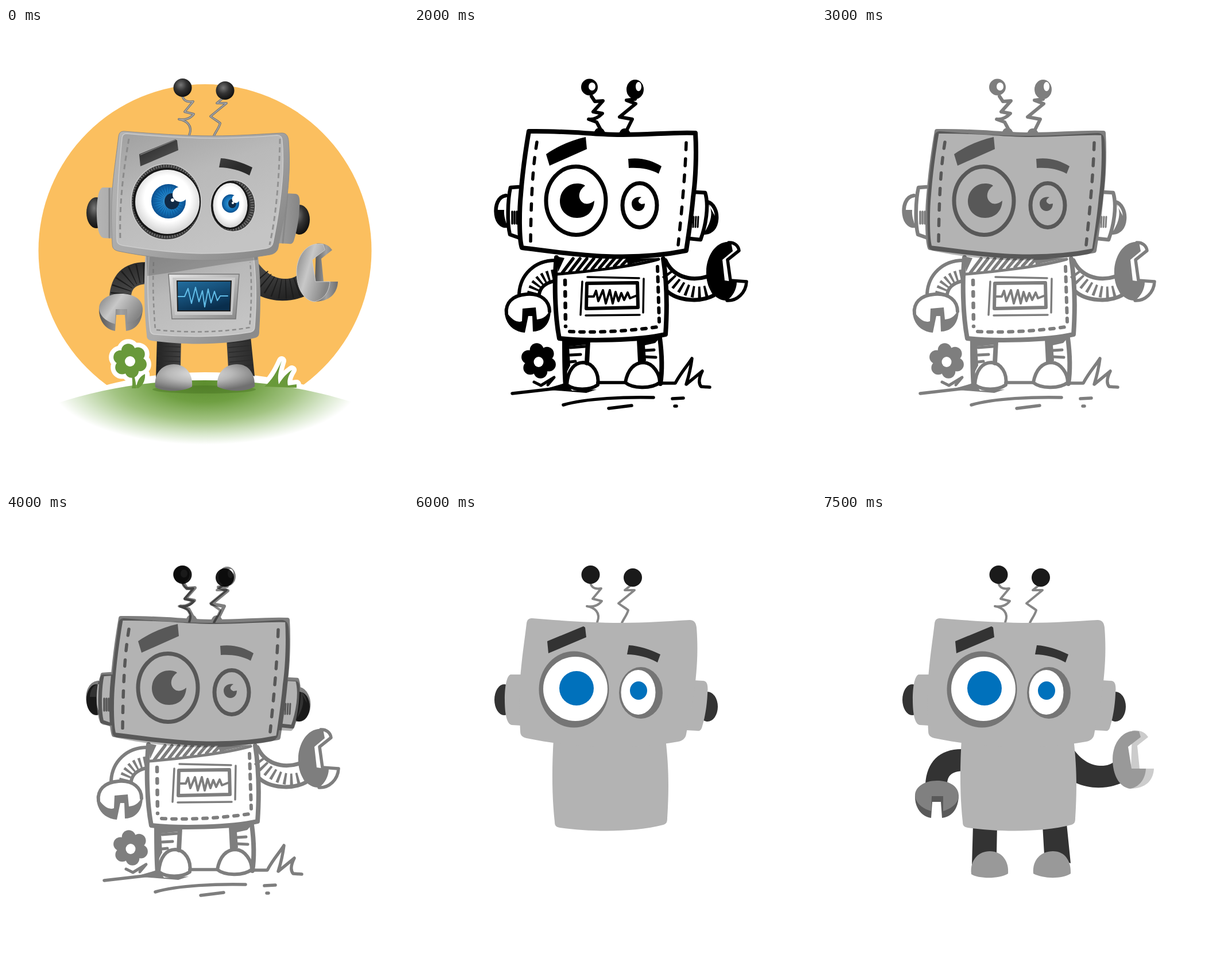
Animation, 700 px wide and 800 px high, one loop 8 s. Source, as an HTML page:

```html
<!DOCTYPE html>
<html lang="en">
<head>
<meta charset="utf-8">
<title>Robot, from sketch to colour</title>
<style>
html, body { margin: 0; width: 100%; height: 100%; overflow: hidden; background: #fff; }
svg { display: block; width: 100%; height: 100%; }
</style>
</head>
<body>
<svg id="stage" viewBox="0 0 700 800"></svg>
<script>
const LOOP = 8000;

// Drawing helpers: each returns SVG markup.
const fill = (d, c = 'currentColor', more = '') => `<path d="${d}" fill="${c}" ${more}/>`;
const line = (d, w, c = 'currentColor', more = '') =>
  `<path d="${d}" fill="none" stroke="${c}" stroke-width="${w}" stroke-linejoin="round" stroke-linecap="round" ${more}/>`;
const faint = (d, w, alpha = .5) => line(d, w, 'currentColor', `opacity="${alpha}"`);
const dash = (d, w, pattern, c = 'currentColor', cap = 'round') =>
  `<path d="${d}" fill="none" stroke="${c}" stroke-width="${w}" stroke-dasharray="${pattern}" stroke-linecap="${cap}"/>`;
const ribs = (d, w, pattern, c = 'currentColor') => dash(d, w, pattern, c, 'butt');
const oval = (x, y, rx, ry, c, more = '') =>
  `<ellipse cx="${x}" cy="${y}" rx="${rx}" ry="${ry}" fill="${c}" ${more}/>`;
const ring = (x, y, rx, ry, w, alpha = 1) =>
  oval(x, y, rx, ry, 'none', `stroke="currentColor" stroke-width="${w}" opacity="${alpha}"`);
const move = (x, y, s) => `<g transform="translate(${x} ${y})">${s}</g>`;
const stops = list => list.map((c, i) => {
  const [color, at = i / (list.length - 1)] = c.split('@');
  return `<stop offset="${at}" stop-color="${color}"/>`;
}).join('');
const linear = (id, x2, y2, ...list) =>
  `<linearGradient id="${id}" x1="0" y1="0" x2="${x2}" y2="${y2}">${stops(list)}</linearGradient>`;
const radial = (id, x, y, r, ...list) =>
  `<radialGradient id="${id}" cx="${x}" cy="${y}" r="${r}">${stops(list)}</radialGradient>`;
const hatch = (n, x, y, step, dx, dy, w) =>
  Array.from({ length: n }, (_, i) => line(`M${x + i * step},${y}l${dx},${dy}`, w)).join('');
const petals = (x, y, dist, r, c, more) => Array.from({ length: 6 }, (_, i) => {
  const a = (i * 60 + 20) * Math.PI / 180;
  return oval((x + dist * Math.cos(a)).toFixed(1), (y + dist * Math.sin(a)).toFixed(1), r, r, c, more);
}).join('');

// Outlines shared by the flat and the shaded robot.
const P = {
  head: 'M206,180C255,184 310,188 360,188C405,188 440,185 480,183C488,183 491,188 492,196C495,235 493,265 489,300C484,335 478,360 474,382C473,390 466,394 460,395C420,402 380,405 339,405C290,404 240,398 196,389C188,387 185,384 185,376C183,340 183,300 186,272C189,240 193,215 196,189C197,182 200,180 206,180Z',
  earL: 'M168,278L187,278L187,367L170,366C160,364 158,340 158,322C158,300 161,281 168,278Z',
  earR: 'M486,288L504,289C512,290 512,300 511,312C510,335 506,355 502,368C500,376 497,377 492,376L472,375Z',
  springL: 'M307,118C309,126 314,130 326,128L311,146L327,150C321,158 311,161 301,159C314,161 326,170 319,187',
  springR: 'M377,123L367,131L384,131L356,154C364,160 370,163 373,166C371,174 365,181 362,188',
  browL: 'M232,220L295,194L298,196L300,213L234,241Z',
  browR: 'M374,227C392,228 410,234 429,243L424,257C410,249 390,243 371,243Z',
  body: 'M243,390C240,440 240,490 245,535C245,542 248,544 254,545C310,553 385,553 434,540C440,538 441,535 441,528C444,480 444,440 438,390Z',
  legL: 'M263,540L305,540L304,590L261,610Z',
  legR: 'M384,540L426,538L433,607L387,592Z',
  footL: 'M260,626C257,600 274,586 292,586C314,586 326,604 324,625C308,635 272,634 260,626Z',
  footR: 'M368,625C366,600 382,586 402,586C424,586 434,604 433,625C417,635 385,634 368,625Z',
  armL: 'M246,408C205,407 182,430 180,470L218,470C218,455 225,447 246,446Z',
  armR: 'M436,405C452,430 472,438 490,437C500,436 506,433 510,428L522,467C500,476 470,480 440,466Z',
  clawSide: 'M162,488C161,512 175,526 190,528L192,500L207,500L209,528C226,526 238,512 238,488L212,480L190,480Z',
  clawTop: 'M190,516L191,490L211,490L211,516C228,511 238,500 238,489C238,473 222,463 200,463C178,463 162,474 162,489C163,502 175,512 190,516Z',
  wrenchSide: 'M540,376C556,374 563,380 568,387L549,402L553,442L578,442C577,463 563,477 537,477Z',
  wrench: 'M552,377C524,371 506,398 506,425C506,455 519,475 537,477C552,474 563,461 564,442L539,442L533,404L555,387Z'
};
const EARS = [[157, 322, 17, 27], [511, 334, 18, 26]];

const flat = {
  legs: fill(P.legL + P.legR, '#333') + fill(P.footL + P.footR, '#999'),
  arms: fill(P.armL + P.armR, '#333'),
  hands: fill(P.clawSide, '#595959') + fill(P.clawTop, '#808080') +
    fill(P.wrenchSide, '#ccc') + fill(P.wrench, '#999'),
  body: fill(P.body, '#b3b3b3'),
  ears: EARS.map(e => oval(...e, '#333')).join('') + fill(P.earL + P.earR, '#b3b3b3'),
  antennae: line(P.springL + P.springR, 4, '#868686') +
    oval(307.5, 104, 16, 16, '#1a1a1a') + oval(381, 109, 16, 16, '#1a1a1a'),
  head: fill(P.head, '#b3b3b3'),
  eyes: oval(278.5, 304, 61, 66.5, '#757575') + oval(281, 303, 56, 56, '#fff') + oval(283, 302, 30, 30, '#0071bc') +
    oval(395, 310, 38, 45, '#757575') + oval(390.5, 309, 30, 39, '#fff') + oval(391, 306, 15, 16, '#0071bc'),
  brows: fill(P.browL + P.browR, '#333')
};

const footLines =
  line('M266,622C268,595 280,583 295,583C312,584 323,602 320,622C306,632 280,632 266,622Z', 6) +
  line('M368,618C372,595 384,583 400,583C416,584 428,602 428,618C412,630 380,628 368,618Z', 6);

const ink =
  line('M200,180C250,179 290,183 330,185C390,189 440,181 490,183C492,215 491,260 486,295C483,330 478,360 474,388C430,397 385,400 335,398C280,396 230,388 188,383C183,370 183,320 186,290C189,250 194,215 200,180Z', 8) +
  // antennae
  fill('M291,103a14.5,14.5 0 1 0 29,0a14.5,14.5 0 1 0 -29,0ZM304,102a6,7 0 1 0 12,0a6,7 0 1 0 -12,0Z', 'currentColor', 'fill-rule="evenodd"') +
  fill('M370,107a15,17 0 1 0 30,0a15,17 0 1 0 -30,0ZM386,102a5,8 0 1 0 10,0a5,8 0 1 0 -10,0Z', 'currentColor', 'fill-rule="evenodd"') +
  line('M309,119L315,128L329,127L312,146L328,149C320,157 312,160 304,159L318,164L325,177', 6) +
  line('M385,124L370,126L386,132L358,155L380,159L371,177', 6) +
  fill('M313,185a10,11 0 0 1 20,0ZM357,186a10,11 0 0 1 20,0Z') +
  // face
  fill('M230,220C250,206 275,195 299,190L301,211L236,240ZM373,228C395,225 415,231 431,241L426,254C410,245 392,243 374,244Z') +
  ring(282, 301, 52, 59.5, 7) + ring(393, 309, 30, 38.5, 7) +
  fill('M298,275C286,283 284,298 295,305C301,308 308,306 314,301C313,320 301,331 284,331C266,331 254,318 254,302C254,284 268,271 284,271C290,271 295,272 298,275Z') +
  fill('M396,295C389,299 389,304 396,307L402,306C402,314 397,319 391,319C384,319 379,313 379,306C379,299 386,293 396,295Z') +
  dash('M214,199C209,230 204,270 203,376', 5.5, '11 16') + dash('M474,200C472,260 466,320 460,378', 5.5, '12 16') +
  // ears
  line('M182,277L168,278C163,300 162,340 167,360L184,366M160,292C146,294 141,310 143,325C145,340 154,346 162,345', 6.5) +
  fill('M143,317L157,317C156,328 160,338 163,346C150,346 143,335 143,317Z') +
  hatch(3, 171, 320, 4, 0, 21, 3.5) + hatch(4, 483, 329, 4, -1, 18, 3) +
  line('M489,286L507,287C514,310 508,345 499,369L480,367M511,303C522,306 528,320 527,333C526,348 518,356 506,357', 6.5) +
  fill('M511,304C523,318 517,340 505,357C520,357 528,345 527,333Z') +
  // body
  line('M248,400C244,440 245,500 253,541C300,546 390,545 438,534C441,490 440,440 434,402', 8) +
  fill('M248,398L262,401L251,425Z') +
  line('M250,429C300,425 380,416 426,403', 5) +
  Array.from({ length: 10 }, (_, i) => line(`M${277 + i * 12},402L${258 + i * 13},${427 - i * 1.7}`, 5.5)).join('') +
  fill('M370,402L428,401L372,412Z') +
  dash('M263,440L264,520', 6.5, '7 13') + dash('M271,529C330,532 390,526 424,521', 6, '7 11') + dash('M424,416L427,512', 6, '8 10') +
  line('M293,442L290,500M302,434L392,436M400,437L399,496M299,501L393,500', 3.5) +
  line('M301,445L389,444L390,487L300,489Z', 6) +
  line('M303,468L313,468L317,458L321,476L329,457L334,480L341,457L346,480L351,460L356,476L361,462L366,474L372,461L376,471L386,467', 4) +
  // arms and hands
  line('M246,405C210,405 185,430 183,463M244,441C228,445 220,452 218,464', 6) +
  ribs('M244,430C222,433 209,446 206,463', 18, '4 4.5') +
  line('M161,498C159,480 170,466 196,464C222,462 236,476 236,494', 6) +
  fill('M158,488C165,505 178,515 188,511L189,489L212,487L214,508C226,507 234,500 238,488C239,514 226,529 207,529L206,502L199,502L193,531C170,529 156,512 158,488Z') +
  line('M438,405C450,432 480,443 511,433M440,458C460,477 500,478 522,466', 7) +
  ribs('M440,428C460,456 490,468 517,456', 20, '4.5 6.5') +
  line('M548,374C558,373 565,380 566,388L546,404L551,440L579,442C578,462 562,476 545,475', 5.5) +
  fill('M552,373C525,369 507,400 509,430C510,458 527,476 545,475C555,468 562,455 562,443L541,440L537,404L555,389Z') +
  // legs, ground, plants
  line('M262,545C262,570 262,600 264,624M303,546L301,584M392,543L394,582M428,540C432,570 432,600 429,620', 8) +
  fill('M260,545L303,545L300,552L270,555L272,588L262,608ZM390,542L428,540L420,549L402,553L404,580L394,584Z') +
  line('M272,557L298,555M272,570L290,569M272,582L281,581M402,562L418,561M402,573L421,574', 5) +
  footLines +
  line('M171,637L266,626M320,618L368,618M430,619L455,619C465,600 475,590 484,576C482,592 479,605 474,621L502,598C497,608 494,618 500,625L515,626', 5.5) +
  fill('M225,630L266,618L275,632L318,630L300,636Z') +
  line('M260,657C300,645 370,643 417,644M339,663L379,658M450,646L469,645M454,659L457,659', 5.5) +
  petals(217, 580, 19, 12, 'currentColor') + oval(217, 580, 14, 14, 'currentColor') + oval(217, 582, 8.5, 9, '#fff') +
  line('M209,617L221,623L244,609L233,622', 5);

const sketch =
  line('M198,179C240,176 300,183 360,184C400,184 440,182 470,178M487,182C494,230 490,300 474,385M184,374C230,390 290,399 340,399C390,399 440,394 474,388M200,180C188,240 181,310 183,376', 7, 'currentColor', 'opacity=".92"') +
  faint('M205,184C260,178 300,186 350,186M481,186C482,240 482,290 471,350M250,390C300,396 380,404 470,397', 4) +
  ring(303, 101, 11.5, 13, 7, .9) + ring(383, 105, 11.5, 12.5, 6, .9) +
  line('M307,118L314,128L325,126L313,143L327,147L300,157L317,160L322,178M386,121L370,123L384,129L357,153L377,158L365,176', 8) +
  faint('M231,222L295,192L299,206L236,232ZM371,225L429,238L427,249L369,239Z', 5, .88) +
  // eyes
  ring(277, 298, 50, 56, 9, .85) + ring(276, 297, 44, 51, 3, .45) + ring(389, 306, 30.5, 39, 8.5, .9) +
  oval(281, 298, 27, 29, 'currentColor', 'opacity=".75"') + oval(274, 302, 15, 23, 'currentColor') + oval(295, 288, 14, 16, '#fff') +
  oval(387, 303, 11, 13, 'currentColor') + oval(392, 298, 4, 5, '#fff') +
  faint(`M211,198L208,213M207,232L204,258M203,274L200,300M201,318L203,346M468,207L468,235M466,250L465,275M464,293L462,313M461,325L460,346`, 5, .75) +
  // ears
  fill('M156,285C138,290 132,325 144,345L160,352Z', 'currentColor', 'opacity=".65"') + oval(151, 315, 5, 13, '#fff') +
  line('M160,284C137,290 134,335 145,348L162,355M164,275L159,353L182,361M166,273L178,273M178,279L172,358', 6) +
  fill('M479,310L497,308L495,344L478,347Z', 'currentColor', 'opacity=".55"') +
  line('M488,287L502,288C505,310 504,340 492,367L476,366M505,302C531,310 533,344 500,356M510,310C518,325 517,342 504,352', 6.5) +
  // body
  fill('M250,401L410,404L350,416L255,428Z', 'currentColor', 'opacity=".5"') +
  `<g opacity=".5">${hatch(8, 280, 402, 15, -22, 21, 2)}</g>` +
  line('M246,400C243,440 243,490 245,532C245,540 252,541 260,542C320,547 390,542 437,533C440,490 438,440 433,401', 7.5) +
  faint('M261,405L258,495M426,405L431,500M270,526L420,523', 5) +
  faint('M256,428C300,424 360,416 420,406', 3, .6) +
  faint('M291,436L394,433L395,493L290,495Z', 5) +
  line('M297,441L385,440L385,486L297,487Z', 5) +
  faint('M300,462L312,462L317,451L321,470L327,454L332,470L339,447L343,473L348,453L353,469L358,456L363,468L368,457L373,461L383,461', 4.5, .8) +
  // arms and hands
  line('M244,404C208,404 185,425 181,460M240,440C222,444 216,452 213,464', 6) +
  ribs('M241,422C215,422 200,440 198,461', 27, '4 6') +
  line('M174,515C145,496 155,464 192,461C222,459 236,476 232,494C231,510 220,518 209,520L207,487L190,487L187,523L174,515M187,512C170,510 158,498 157,485M211,508C223,507 231,498 232,486', 7) +
  line('M434,405C450,430 475,437 506,431M440,452C460,476 495,472 512,463', 7) +
  ribs('M440,430C460,454 485,460 509,449', 30, '4.5 6.5') +
  line('M549,371C522,365 506,390 507,424C508,454 523,473 543,473C558,466 564,452 564,438L540,437L529,404L551,390L540,368M549,371L566,387L541,403L548,435L578,437C576,460 560,475 543,474', 5.5) +
  // legs, ground, plants
  line('M258,542L261,620M298,546L294,582M391,545L394,582M428,541C428,570 427,600 424,619', 8) +
  faint('M266,554L292,553M266,566L291,565M266,577L283,577M398,552L421,552M399,565L423,564M403,576L423,576', 6, .75) +
  move(-4, -1, footLines) +
  line('M172,632C210,627 235,626 266,622M314,619C330,616 350,617 366,617M426,620L452,620', 6.5) +
  line('M452,620C463,601 472,587 488,573C476,592 470,608 472,619C481,608 489,601 499,598C490,610 489,620 497,624', 8) +
  faint('M254,655C290,643 360,645 418,643', 6, .85) +
  faint('M333,661L375,658M438,652L449,651M502,624L517,624M267,660L270,668', 5) +
  petals(214, 577, 18, 10, 'currentColor', 'opacity=".85"') + ring(214, 577, 12, 12, 7) + oval(214, 577, 8, 9, '#fff') +
  line('M216,603L222,618M227,606L222,618', 7);

const LEAF = '#69993a';
const halo = 'stroke="#fff" stroke-width="16" stroke-linejoin="round"';
const stem = 'M218,600C220,612 221,620 219,628L227,628C226,616 224,608 221,600ZM227,627C228,615 233,607 242,603C243,614 238,624 230,628Z';
const grass = 'M450,625C463,614 472,598 480,580C475,596 472,608 475,621C482,609 489,602 498,596C491,607 489,615 491,623L506,621L506,627Z';
const ball = (x, y) => oval(x, y, 16, 16, 'url(#ball)');

const shaded =
  oval(346.5, 388, 290, 290, '#fbbf5f') +
  fill('M60,665C150,622 245,600 346,600C450,600 545,622 640,665L640,760L60,760Z', '#fff') +
  petals(216, 580, 18, 12, '#fff', halo) + fill(stem + grass, '#fff', halo) +
  fill('M83,656C170,627 255,614 346,614C440,614 525,627 616,656L616,730L83,730Z', 'url(#hill)') +
  petals(216, 580, 18, 12, LEAF) + oval(216, 580, 14, 14, LEAF) + oval(216, 581, 9, 9, '#fff') + fill(stem + grass, LEAF) +
  oval(345, 630, 90, 7, '#3c651b', 'opacity=".35"') +
  // limbs
  fill(P.legL + P.legR, 'url(#tube)') + ribs('M284,546L282,600', 40, '1.5 7', '#2a2a2a') + ribs('M406,546L411,600', 40, '1.5 7', '#2a2a2a') +
  fill(P.footL + P.footR, 'url(#foot)') +
  fill(P.armL + P.armR, 'url(#arm)') +
  ribs('M241,427C214,427 199,445 199,468', 34, '2 8', '#1c1c1c') +
  ribs('M443,434C462,456 485,461 513,449', 34, '2 8', '#1c1c1c') +
  fill(P.clawSide, 'url(#steelDark)') + fill(P.clawTop, 'url(#steel)') +
  fill(P.wrenchSide, 'url(#steelDark)') + fill(P.wrench, 'url(#steel)') + line(P.wrench, 1, '#ccc') +
  // body
  fill(P.body, 'url(#rim)') +
  fill('M249,398C246,440 247,490 251,527C252,532 255,534 260,534C320,540 380,538 426,530C431,529 433,526 433,520C437,470 435,430 431,398Z', 'url(#plate)', 'stroke="#d0d0d0" stroke-width="1.5"') +
  ribs('M257,408C255,450 257,490 260,526C320,532 380,530 424,522C428,480 428,440 425,408', 2.5, '7 5', '#8c8c8c') +
  fill('M244,396L438,396L438,404C370,412 310,424 246,432Z', '#555', 'opacity=".35"') +
  fill('M283,429L406,429L400,507L289,507Z', 'url(#frame)', 'stroke="#777" stroke-width="1.5"') +
  fill('M290,435L399,435L394,500L294,500Z', '#c9c9c9') +
  fill('M298,441L392,441L390,493L299,493Z', 'url(#screen)', 'stroke="#222" stroke-width="2"') +
  line('M300,468L311,468L317,454L323,480L330,452L336,477L342,458L346,486L352,455L357,479L363,459L368,475L373,467L386,467', 2, '#62bde8') +
  // head
  EARS.map(e => oval(...e, 'url(#ball)')).join('') + fill(P.earL + P.earR, 'url(#ear)') +
  line('M180,280L180,365M490,291L482,374', 3, '#888') +
  line(P.springL + P.springR, 4, '#777') + line(P.springL + P.springR, 1.5, '#aaa') + ball(307.5, 104) + ball(381.5, 109) +
  fill(P.head, 'url(#rim)', 'stroke="#8b8b8b" stroke-width="1"') +
  fill('M210,184C255,188 310,192 360,192C405,192 440,189 472,187C478,187 481,190 481,197C486,250 476,320 465,374C464,380 459,383 454,384C415,391 375,393 340,393C290,392 245,386 203,379C196,378 193,374 193,368C192,310 197,240 202,192C203,186 205,184 210,184Z', 'url(#plate)', 'stroke="#ccc" stroke-width="1.5"') +
  ribs('M214,193C206,240 197,300 199,368', 3, '9 6', '#8b8b8b') + ribs('M477,193C476,250 472,320 459,378', 3, '9 6', '#929292') +
  // eyes
  oval(279, 303, 61, 66, '#3b3b3b', 'stroke="#ccc" stroke-width="1.5"') + ribs('M222,302a57,62 0 1 0 114,0a57,62 0 1 0 -114,0', 5, '1.5 3', '#777') +
  oval(280, 303, 59, 59, '#161616') + oval(281, 303, 56, 56, 'url(#white)') +
  oval(283, 302, 30, 30, 'url(#iris)') + ribs('M264,302a19,19 0 1 0 38,0a19,19 0 1 0 -38,0', 20, '1 3', '#0b5799') +
  oval(289, 302, 13, 14, '#102a46') + oval(303, 290, 13, 13, '#fff') + oval(290, 300, 3, 3, '#fff') +
  oval(395, 310, 39, 45, '#3b3b3b', 'stroke="#ccc" stroke-width="1.5"') + ribs('M361,310a34,40 0 1 0 68,0a34,40 0 1 0 -68,0', 6, '1.5 3', '#777') +
  oval(390.5, 309, 33, 42, '#161616') + oval(390.5, 309, 30, 39, 'url(#white)') +
  oval(391, 306, 15, 16, 'url(#iris)') + oval(394, 306, 7, 8, '#102a46') + oval(400, 298, 6.5, 7, '#fff') + oval(395, 305, 2, 2, '#fff') +
  fill(P.browL + P.browR, 'url(#brow)') + line('M234,221L295,195', 1.5, '#777');

const defs = '<defs>' +
  '<radialGradient id="hill" gradientUnits="userSpaceOnUse" cx="0" cy="0" r="1" gradientTransform="translate(346 620) scale(268 106)">' +
    stops(['#5c8d2e@0', '#6f9f42@.3', '#a3c483@.6', '#dbe9d0@.84', '#fff@1']) + '</radialGradient>' +
  linear('plate', .5, 1, '#a0a0a0', '#b9b9b9@.45', '#c4c4c4') +
  linear('rim', 1, .7, '#b5b5b5', '#aaa', '#8b8b8b') +
  linear('ear', 1, 0, '#b5b5b5', '#8f8f8f@.3', '#d8d8d8@.65', '#858585') +
  linear('tube', 1, 0, '#222', '#555@.4', '#2a2a2a') +
  linear('arm', 1, .8, '#222', '#4b4b4b', '#242424') +
  linear('steel', 1, .5, '#7d7d7d', '#c8c8c8@.45', '#858585') +
  linear('steelDark', 1, 0, '#555', '#a2a2a2', '#6e6e6e') +
  linear('frame', 1, 1, '#e6e6e6', '#888') +
  linear('screen', .5, 1, '#226e9f', '#164f78', '#092e4d') +
  linear('brow', 1, .5, '#222', '#555', '#2b2b2b') +
  radial('foot', .45, .35, .65, '#e2e2e2', '#b8b8b8@.5', '#707070') +
  radial('ball', .4, .35, .65, '#777', '#333@.5', '#111') +
  radial('white', .5, .45, .55, '#fff@.65', '#d2d2d2') +
  radial('iris', .5, .5, .5, '#45a2dc', '#1475bb@.65', '#0c4f8e') +
  '<filter id="brush"><feTurbulence baseFrequency=".05" numOctaves="2" seed="4"/>' +
    '<feDisplacementMap in="SourceGraphic" scale="4" xChannelSelector="R" yChannelSelector="G"/>' +
    '<feGaussianBlur stdDeviation=".9"/></filter></defs>';

// [start, end, markup, attributes], from back to front
const layers = [
  [0, 1000, shaded],
  [1000, 2000, sketch, 'color="#a5161d" filter="url(#brush)"'],
  [6500, LOOP, flat.legs],
  [7000, LOOP, flat.arms],
  [7500, LOOP, flat.hands],
  [6000, LOOP, flat.body],
  [3500, LOOP, flat.ears],
  [4000, LOOP, flat.antennae],
  [3000, LOOP, flat.head],
  [4500, LOOP, flat.eyes],
  [5500, LOOP, flat.brows],
  [2000, 2500, ink, 'color="#000"'],
  [2500, 5000, ink, 'color="#000" opacity=".5"']
];

const stage = document.getElementById('stage');
stage.innerHTML = defs + layers.map(([, , s, attrs = '']) => `<g class="layer" ${attrs}>${s}</g>`).join('');
const groups = stage.querySelectorAll('.layer');

function draw(t) {
  layers.forEach(([from, to], i) => {
    groups[i].style.display = t >= from && t < to ? '' : 'none';
  });
}

const start = performance.now();
function tick() {
  draw((performance.now() - start) % LOOP);
  requestAnimationFrame(tick);
}
tick();
</script>
</body>
</html>
```
